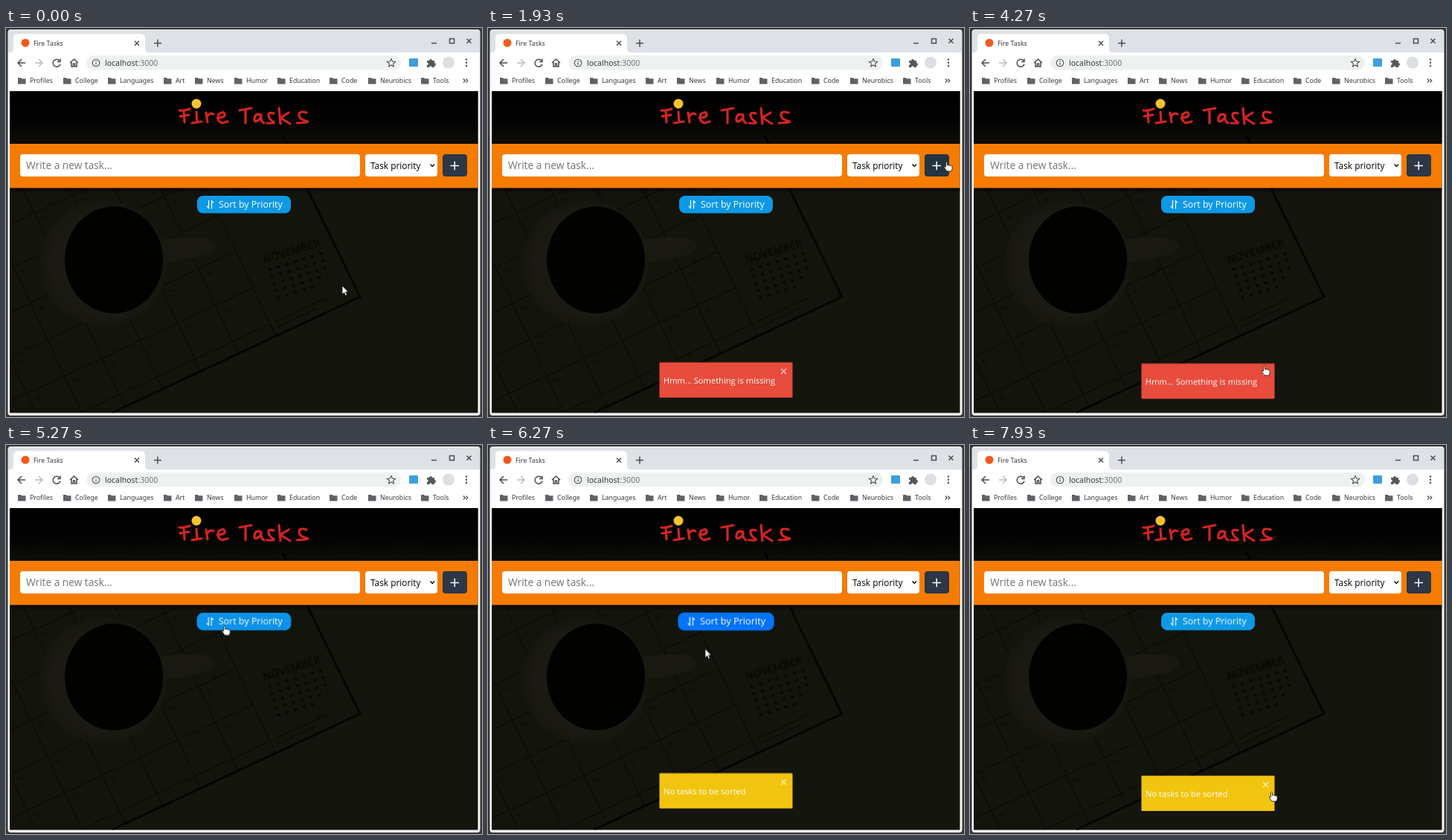
Animation, 640 px wide and 524 px high, one loop 8 s. Source, as an HTML page:

```html
<!DOCTYPE html>
<html lang="en">
<head>
<meta charset="utf-8">
<title>Fire Tasks</title>
<style>
  html, body { margin: 0; width: 100%; height: 100%; overflow: hidden; background: #333; }
  svg { display: block; width: 100vw; height: 100vh; }
  text { font-family: "Open Sans", "Noto Sans", sans-serif; white-space: pre; }
  .ui text { font-family: "Noto Sans", sans-serif; font-size: 8.8px; fill: #35383c; }
  .line { fill: none; stroke: #4a4d51; stroke-width: 1.5; }
  .toast text { font-size: 11.15px; fill: #fff; }
  .toast path { stroke: #fff; stroke-opacity: .75; stroke-width: 1.3; }
  #sort { transform-box: fill-box; transform-origin: center; }
</style>
</head>
<body>
<svg viewBox="0 0 640 524">
  <defs>
    <clipPath id="view"><rect x="5" y="85" width="629.5" height="433.5"/></clipPath>
    <clipPath id="sheet"><path d="M375 155L476 362 143 518H5V85H340Z"/></clipPath>
    <linearGradient id="shade" x2="0" y2="1">
      <stop stop-color="#000"/>
      <stop offset=".55" stop-color="#020302"/>
      <stop offset="1" stop-color="#0d0e08"/>
    </linearGradient>
    <linearGradient id="drop" x2="0" y2="1">
      <stop stop-color="#000" stop-opacity=".65"/>
      <stop offset="1" stop-color="#000" stop-opacity="0"/>
    </linearGradient>
    <radialGradient id="saucer">
      <stop offset=".8" stop-color="#1a1a13"/>
      <stop offset="1" stop-color="#16160f"/>
    </radialGradient>
  </defs>

  <!-- browser window -->
  <rect width="640" height="524" fill="#373735"/>
  <rect x="2.5" y="2" width="635" height="520" rx="4" fill="#f7f7f5"/>
  <g class="ui">
    <path d="M3 33V7Q3 3 8 3H632Q637 3 637 7V33Z" fill="#dee1e6"/>
    <path d="M5 33Q10 33 10 28V14Q10 8 16 8H181Q187 8 187 14V28Q187 33 192 33Z" fill="#fff"/>
    <path d="M3 33H637V85H3Z" fill="#fff"/>
    <circle cx="26" cy="20" r="5.5" fill="#f4581c"/>
    <text x="37" y="23.5">Fire Tasks</text>
    <path class="line" d="M173 17.5l6 6m0-6l-6 6M199 20.500h10m-5-5v10M572 20.500h7M596.500 14.500h6v6h-6zM619.500 14.500l6 6m0-6l-6 6"/>
    <path class="line" d="M26 47H16m5-5l-5 5 5 5"/>
    <path class="line" style="stroke:#babcbe" d="M39 47H49m-5-5l5 5-5 5"/>
    <path class="line" d="M72 44A5 5 0 1 0 73 48.500M73 41.500v4h-4M86 47l5.500-5 5.500 5M88 46v6h2.500v-4h2v4H95v-6"/>
    <rect x="108" y="37" width="423" height="19.500" rx="9.700" fill="#eff1f1"/>
    <circle class="line" cx="121" cy="47" r="4.800" style="stroke-width:1.100"/>
    <path class="line" d="M121 46.500v3M121 44v1.200" style="stroke-width:1.200"/>
    <text x="133" y="50.500" style="font-size:10.500px">localhost<tspan fill="#70757a">:3000</tspan></text>
    <path class="line" style="stroke-width:1.100" d="M518 41.500l1.600 3.600 3.900.4-2.900 2.600.8 3.900-3.400-2-3.400 2 .8-3.900-2.900-2.600 3.900-.4z"/>
    <rect x="542" y="41" width="12" height="11" rx="1" fill="#3b9fe0"/>
    <path d="M566 44h3a2 2 0 1 1 4 0h3v3a2 2 0 1 1 0 4v2h-3.500a1.700 1.700 0 0 0-3.400 0H566v-3a1.800 1.800 0 0 0 0-3.600z" fill="#55585c"/>
    <circle cx="595" cy="46.500" r="8" fill="#dcdfe3"/>
    <g fill="#4a4d51"><circle cx="619" cy="42.500" r="1.200"/><circle cx="619" cy="46.800" r="1.200"/><circle cx="619" cy="51" r="1.200"/></g>
    <g id="marks"></g>
    <path class="line" style="stroke-width:1.200" d="M615 68.500l2.300 2.500-2.300 2.500m3.500-5l2.300 2.500-2.300 2.500"/>
  </g>

  <!-- page -->
  <g clip-path="url(#view)">
    <rect x="5" y="85" width="630" height="434" fill="#14150d"/>
    <path d="M375 155L476 362 143 518H5V85H340Z" fill="#13140c"/>
    <g clip-path="url(#sheet)">
      <g id="grid" transform="translate(476 362) rotate(-25.100)" stroke="#080904" fill="none"></g>
    </g>
    <path d="M374 153L476 362 143 518" fill="none" stroke="#050602" stroke-width="3"/>
    <circle cx="131" cy="317" r="85" fill="url(#saucer)"/>
    <path d="M208 285Q270 275 280 291T212 316Z" fill="#191912"/>
    <ellipse cx="145" cy="312.500" rx="66" ry="72" fill="#020201"/>
    <g transform="translate(347 317) rotate(-17)" fill="#080904">
      <text style="font-size:14.500px;font-weight:600" textLength="auto">NOVEMBER</text>
      <path d="M3 10H82M3 20H80M3 30H78M3 40H76M3 50H60" stroke="#080904" stroke-width="4" stroke-dasharray="4 8"/>
    </g>
    <rect x="5" y="85" width="630" height="71" fill="url(#shade)"/>
    <path d="M372 145l6 12" stroke="#000" stroke-width="2"/>

    <g role="img" aria-label="Fire Tasks" fill="none" stroke="#d42422" stroke-width="3.200" stroke-linecap="round" stroke-linejoin="round">
      <path d="M233 111Q239 112 247 109M239 111L240 127M234 119L246 117"/>
      <path d="M256 113L257 127M250 128L263 126"/>
      <path d="M269 114L271 127M270 120Q274 113 279 116"/>
      <path d="M284 121Q295 121 294 116T286 116Q283 126 291 128L298 126"/>
      <path d="M314 111L330 108M322 110L322 128"/>
      <path d="M343 117Q335 114 334 122T342 122L343 117Q342 126 347 128"/>
      <path d="M360 115Q352 113 353 118T359 126 351 128"/>
      <path d="M367 108L369 129M380 114L369 121 382 129"/>
      <path d="M404 114Q394 111 394 117T403 125 391 128"/>
    </g>
    <circle cx="256" cy="102" r="6.500" fill="#f9c32f"/>

    <rect x="5" y="215" width="630" height="8" fill="url(#drop)"/>
    <rect x="5" y="156" width="630" height="59.500" fill="#f57c00"/>
    <rect x="19" y="170" width="457" height="30" rx="4" fill="#fff"/>
    <text x="27" y="190" style="font-size:13.700px" fill="#737373">Write a new task...</text>
    <rect x="483" y="170" width="97" height="30" rx="4" fill="#fff"/>
    <text x="490" y="190" style="font-size:11.850px" fill="#000">Task priority</text>
    <path d="M570.500 183.500l2.800 3 2.800-3" fill="none" stroke="#111" stroke-width="1.500"/>
    <rect id="add" x="587" y="170" width="33" height="30" rx="4" fill="#2d3748"/>
    <path d="M597.500 185.500h11.500m-5.750-5.750v11.500" stroke="#fff" stroke-width="1.500"/>

    <g id="sort">
      <rect x="257" y="226" width="126" height="23.500" rx="8" fill="#0d99e6"/>
      <path d="M272.500 232v10.500l-2.500-2.500M276.500 243.500v-10.500l2.500 2.500" fill="none" stroke="#fff" stroke-width="1.200"/>
      <text x="286" y="242" style="font-size:12.400px" fill="#fff">Sort by Priority</text>
    </g>

    <g class="toast" id="error">
      <rect x="230.500" y="445.500" width="179" height="47.500" rx="1" fill="#e74c3c"/>
      <text x="236" y="473.500">Hmm... Something is missing</text>
      <path d="M394 454l7 7m0-7l-7 7"/>
    </g>
    <g class="toast" id="warn">
      <rect x="230.500" y="445.500" width="179" height="47.500" rx="1" fill="#f1c40f"/>
      <text x="236" y="473.500">No tasks to be sorted</text>
      <path d="M394 454l7 7m0-7l-7 7"/>
    </g>
  </g>

  <!-- pointer -->
  <g id="pointer" stroke="#111" stroke-width=".8" stroke-linejoin="round" fill="#fff">
    <path id="arrow" d="M0 0V12L2.700 9.500 4.500 13.500 6.500 12.600 4.700 8.700H8.300Z"/>
    <path id="hand" d="M2.500 1.200Q3.500-.2 4.500 1.200V5Q6 4 7 5.200 8.500 4.500 9.200 5.700 11 5.300 11.200 7V9.500L10 13H4L.8 8.500Q0 6.800 1.300 6.700L2.500 7.500Z"/>
  </g>
</svg>

<script>
const LOOP = 8000;
const $ = id => document.getElementById(id);

function add(parent, tag, attrs, text = "") {
  const el = document.createElementNS("http://www.w3.org/2000/svg", tag);
  for (const k in attrs) el.setAttribute(k, attrs[k]);
  el.textContent = text;
  parent.append(el);
}

const marks = { Profiles: 16, College: 77, Languages: 137, Art: 212, News: 254, Humor: 307,
  Education: 365, Code: 435, Neurobics: 487, Tools: 558 };
for (const [name, x] of Object.entries(marks)) {
  add($("marks"), "path", { d: `M${x} 67h4l1 1.300h5.500v7.200H${x}z`, fill: "#5f6368" });
  add($("marks"), "text", { x: x + 16, y: 74 }, name);
}

// calendar ruling with a small mark in each cell
for (let r = 0; r < 9; r++) {
  const y = -18 - r * 54;
  add($("grid"), "path", { d: `M-560 ${y}H-125M${-125 - r * 56} 0V-470` });
  for (let c = 0; c < 7; c++)
    add($("grid"), "path", { d: `M${-174 - c * 56} ${y - 44}h3v4m3-4v4`, opacity: 0.8 });
}
add($("grid"), "path", { d: "M-118 -18h75m-75 8h60M-120 -200h40m-42 8h36" });

// rows: [ms, value, easing to the next row]; ends are held
let clips = [];
function play(el, rows, make) {
  const all = [[0, rows[0][1]], ...rows, [LOOP, rows[rows.length - 1][1]]];
  const frames = all.map(([ms, v, easing = "linear"]) => ({ offset: ms / LOOP, easing, ...make(v) }));
  clips.push(el.animate(frames, { duration: LOOP, iterations: Infinity }));
}

const moveY = y => ({ transform: `translate(0px, ${y}px)` });
const moveTo = ([x, y]) => ({ transform: `translate(${x}px, ${y}px)` });
const OUT = "cubic-bezier(.215,.61,.355,1)";
const enter = t => [[t, 3000, OUT], [t + 420, -20, OUT], [t + 525, 10, OUT], [t + 630, -5, OUT], [t + 700, 0]];
const leave = t => [[t, 0, "ease"], [t + 140, 10, "ease"], [t + 280, -20], [t + 315, -20, "ease"], [t + 700, 2000]];

play($("error"), [...enter(1465), ...leave(4115)], moveY);
play($("warn"), enter(5690), moveY);

play($("pointer"), [
  [40, [452, 347], "ease-in"], [270, [474, 369]], [480, [530, 340]], [700, [592, 250], "ease-out"],
  [870, [612, 213]], [1000, [627, 200]], [1120, [620, 184], "ease-out"], [1270, [613, 180]],
  [1940, [613, 180], "ease-in"], [2150, [545, 270]], [2400, [370, 430], "ease-out"],
  [2600, [275, 476], "ease-out"], [2760, [243, 479], "ease-in-out"], [2930, [255, 471]],
  [3200, [320, 476], "ease-out"], [3470, [375, 466], "ease-out"], [3800, [392, 455]],
  [4330, [392, 455], "ease-in"], [4600, [368, 400]], [4950, [312, 282], "ease-out"],
  [5200, [292, 247], "ease-out"], [5290, [290, 243]],
  [6060, [290, 243], "ease-in"], [6270, [292, 274]], [6420, [278, 350]], [6600, [250, 445], "ease-out"],
  [6800, [238, 475]], [6870, [238, 476]], [7110, [238, 476], "ease-in"],
  [7400, [282, 472]], [7700, [366, 468], "ease-out"], [7920, [402, 467]]
], moveTo);

const HAND = [[0, 0], [1030, 1], [2010, 0], [2490, 1], [4370, 0], [5230, 1], [6150, 0], [6610, 1]]
  .map(([ms, on]) => [ms, on, "step-end"]);
play($("hand"), HAND, on => ({ opacity: on }));
play($("arrow"), HAND, on => ({ opacity: 1 - on }));

play($("add"), [[1000, "#2d3748"], [1250, "#243542"], [1970, "#243542"], [2220, "#2d3748"]], fill => ({ fill }));

const hover = (off, on) => [[5230, off, "ease"], [5530, on], [6230, on, "ease"], [6530, off]];
play($("sort"), hover(1, 1.03), k => ({ transform: `scale(${k})` }));
play($("sort").firstElementChild, hover("#0d99e6", "#006cff"), fill => ({ fill }));

const start = document.timeline.currentTime;
clips.forEach(c => c.startTime = start);
</script>
</body>
</html>
```
